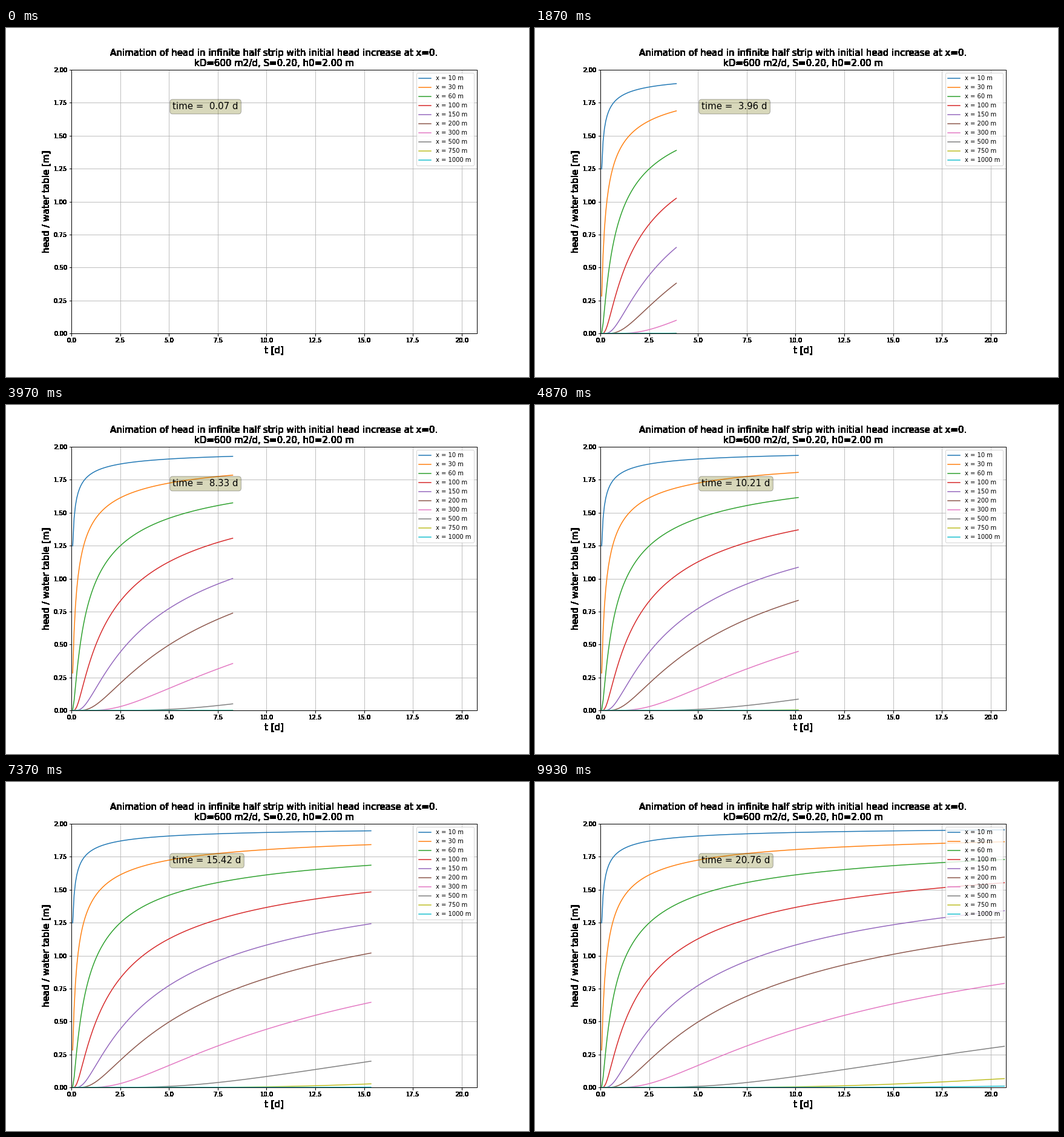
These frames come from a looping animation (864x576 px, 9960 ms). A matplotlib script:

```python
import math

import numpy as np
import matplotlib.pyplot as plt
from matplotlib.animation import FuncAnimation

plt.rcParams["font.family"] = "DejaVu Sans"

LOOP_MS = 9960
STEPS = 299
DT = 100 / 1440          # one step is 100 minutes, in days
KD, S, H0 = 600, 0.2, 2.0
DISTANCES = [10, 30, 60, 100, 150, 200, 300, 500, 750, 1000]
BOX = [0.125, 0.125, 0.775, 0.755]

t = DT * np.arange(1, STEPS + 1)


def head(x):
    return [H0 * math.erfc(x * math.sqrt(S / (4 * KD * ti))) for ti in t]


def harden(img, dpi):
    """Turn every touched pixel solid black, without antialiasing."""
    out = np.zeros(img.shape, np.uint8)
    out[..., 3] = np.where(img[..., 3] > 0, 255, 0)
    return out, 0, 0


def add_axes(fig):
    ax = fig.add_axes(BOX)
    ax.set(xlim=(0, t[-1]), ylim=(0, H0))
    return ax


fig = plt.figure(figsize=(12, 8), dpi=72, facecolor="white")

# Grid, curves, legend and clock
ax = add_axes(fig)
ax.axis("off")
grid = dict(color="#b0b0b0", lw=0.8, zorder=1)
ax.vlines(np.arange(0, 20.1, 2.5), 0, H0, **grid)
ax.hlines(np.arange(0, 2.01, 0.25), 0, t[-1], **grid)

heads = [head(x) for x in DISTANCES]
lines = [ax.plot([], [], lw=1.5, label=f"x = {x} m")[0] for x in DISTANCES]
ax.legend(loc="upper right", fontsize=10)
clock = ax.text(0.25, 0.85, "", transform=ax.transAxes, fontsize=15,
                bbox=dict(boxstyle="round", facecolor="#808020", alpha=0.3))

# Spines, ticks and labels in crisp black
frame = add_axes(fig)
frame.patch.set_visible(False)
frame.set_xticks(np.arange(0, 20.1, 2.5))
frame.set_yticks(np.arange(0, 2.01, 0.25))
frame.tick_params(labelsize=10)
frame.set_title("Animation of head in infinite half strip with initial head "
                "increase at x=0.\n"
                f"kD={KD} m2/d, S={S:.2f}, h0={H0:.2f} m", fontsize=15)
frame.set_xlabel("t [d]", fontsize=15)
frame.set_ylabel("head / water table [m]", fontsize=15)
frame.set_agg_filter(harden)


def update(i):
    for line, h in zip(lines, heads):
        line.set_data(t[:i], h[:i])
    clock.set_text(f"time = {t[i]:5.2f} d")
    return [*lines, clock]


anim = FuncAnimation(fig, update, frames=STEPS, interval=LOOP_MS / STEPS,
                     repeat=True, repeat_delay=0, blit=False)
plt.show()
```
